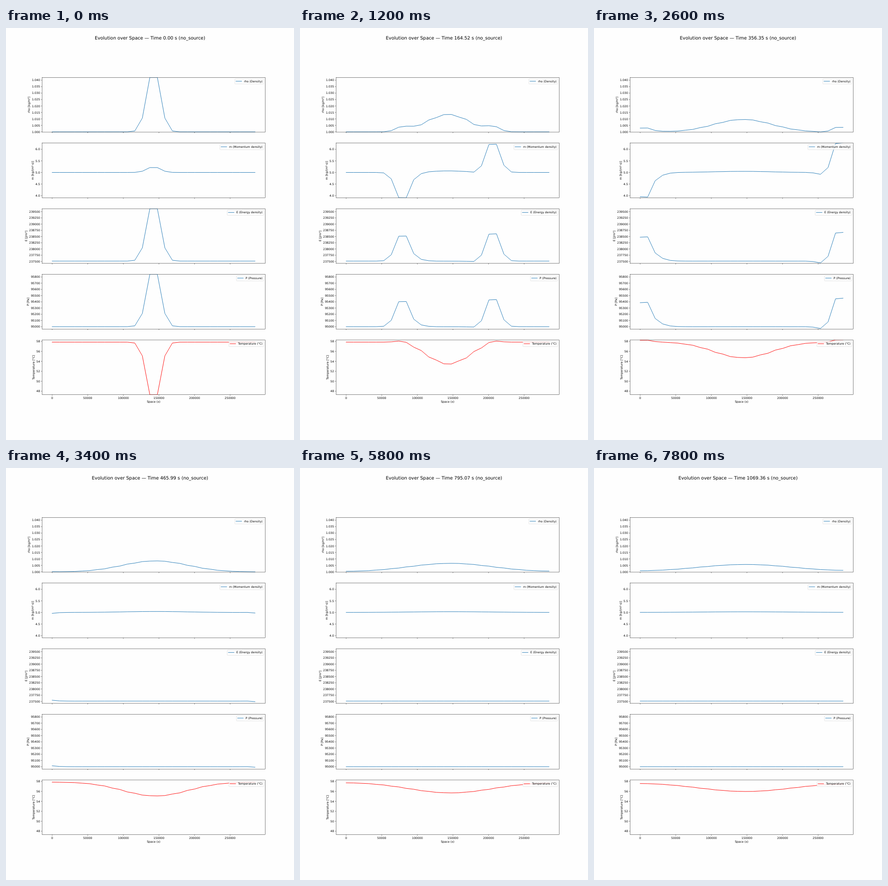
These frames come from a looping animation (626x894 px, 8000 ms). An HTML page:

```html
<!DOCTYPE html>
<html lang="en">
<head>
<meta charset="utf-8">
<title>Evolution over Space</title>
<style>
  html, body { margin: 0; width: 100%; height: 100%; overflow: hidden; background: #fefefe; }
  svg { display: block; width: 626px; height: 894px; }
  text { font-family: "DejaVu Sans", sans-serif; text-rendering: geometricPrecision; fill: #000; }
</style>
</head>
<body>
<svg id="stage" viewBox="0 0 626 894"></svg>
<script>
// Gas flow: Lax-Friedrichs scheme for the 1D Euler equations
const CELLS = 28, LENGTH = 285000, DX = 10000, STEPS = 40, STEP_MS = 200;
const GAMMA = 1.4, R = 287;

const pressure = ([rho, m, E]) => (GAMMA - 1) * (E - m * m / (2 * rho));

function flux(cell) {
  const [rho, m, E] = cell, p = pressure(cell), u = m / rho;
  return [m, m * u + p, u * (E + p)];
}

function initialState() {
  return Array.from({ length: CELLS }, (_, i) => {
    const x = LENGTH * (i / (CELLS - 1) - 0.5);
    const bump = Math.exp(-x * x / (2 * 9000 ** 2));
    const rho = 1 + 0.05 * bump, u = 5, p = 95000 + 1000 * bump;
    return [rho, rho * u, p / (GAMMA - 1) + rho * u * u / 2];
  });
}

function advance(state, dt) {
  const fluxes = state.map(flux);
  return state.map((cell, i) => {
    const l = Math.max(i - 1, 0), r = Math.min(i + 1, CELLS - 1);
    return cell.map((_, k) =>
      (state[l][k] + state[r][k]) / 2 - dt / (2 * DX) * (fluxes[r][k] - fluxes[l][k]));
  });
}

function simulate() {
  const result = [];
  let state = initialState(), time = 0;
  for (let n = 0; n < STEPS; n++) {
    result.push({ time, state });
    const dt = DX / Math.max(...state.map(c => Math.sqrt(GAMMA * pressure(c) / c[0])));
    state = advance(state, dt);
    time += dt;
  }
  return result;
}

// Figure layout, in pixels
const PT = 626 / 14 / 72, EM = 10 * PT;
const LEFT = 78.25, RIGHT = 563.4, TOP = 107.28, HEIGHT = 118.69, PITCH = 142.42;
const BLUE = "#1f77b4";

const panels = [
  { label: "rho [kg/m³]", legend: "rho (Density)", range: [0.99977, 1.0421],
    ticks: [1, 0.005, 9], digits: 3, labelX: 52.2, value: c => c[0] },
  { label: "m [kg/(m²·s)]", legend: "m (Momentum density)", range: [3.908, 6.268],
    ticks: [4, 0.5, 5], digits: 1, labelX: 60.1, value: c => c[1] },
  { label: "E [J/m³]", legend: "E (Energy density)", range: [237420, 239618],
    ticks: [237500, 250, 9], digits: 0, labelX: 46.2, value: c => c[2] },
  { label: "P [Pa]", legend: "P (Pressure)", range: [94962, 95842],
    ticks: [95000, 100, 9], digits: 0, labelX: 50.2, value: pressure },
  { label: "Temperature [°C]", legend: "Temperature (°C)", range: [47.303, 58.293],
    ticks: [48, 2, 6], digits: 0, labelX: 62, color: "red",
    value: c => pressure(c) / (c[0] * R) - 273.15 },
];

const stage = document.getElementById("stage");

function add(tag, attrs, parent = stage) {
  const node = document.createElementNS("http://www.w3.org/2000/svg", tag);
  for (const key in attrs) node.setAttribute(key, attrs[key]);
  return parent.appendChild(node);
}

function addText(content, x, y, anchor = "middle", size = EM, extra = {}) {
  const node = add("text", { x, y, "text-anchor": anchor, "font-size": size, ...extra });
  node.textContent = content;
  return node;
}

const addTick = d => add("path", { d, stroke: "#000", "stroke-width": 0.8 * PT });
const xAt = x => LEFT + (RIGHT - LEFT) * (x / LENGTH + 0.05) / 1.1;

function addLegend(panel, top, color) {
  const right = RIGHT - EM / 2, y = top + EM / 2, pad = 0.4 * EM;
  const box = add("rect", { y, height: 11.2, rx: 0.2 * EM, fill: "#fff", stroke: "#ccc",
    "stroke-width": PT, opacity: 0.8 });
  const text = addText(panel.legend, right - pad, y + 7.2, "end");
  const left = right - text.getComputedTextLength() - 2 * pad - 2.8 * EM;
  box.setAttribute("x", left);
  box.setAttribute("width", right - left);
  add("path", { d: `M${left + pad} ${y + 5.03}h${2 * EM}`, stroke: color,
    "stroke-width": 1.5 * PT, "stroke-linecap": "square" });
}

function buildPanel(panel, index) {
  const top = TOP + PITCH * index, bottom = top + HEIGHT;
  const [low, high] = panel.range, [first, gap, count] = panel.ticks;
  const color = panel.color || BLUE;
  const box = { x: LEFT, y: top, width: RIGHT - LEFT, height: HEIGHT };
  panel.yAt = v => bottom - HEIGHT * (v - low) / (high - low);

  add("rect", box, add("clipPath", { id: "clip" + index }));
  panel.line = add("polyline", { fill: "none", stroke: color, "stroke-width": 1.5 * PT,
    "stroke-linejoin": "round", "stroke-linecap": "square", "clip-path": `url(#clip${index})` });

  for (let i = 0; i < count; i++) {
    const v = first + gap * i, y = panel.yAt(v);
    addTick(`M${LEFT} ${y}h${-3.5 * PT}`);
    addText(v.toFixed(panel.digits), LEFT - 7 * PT, y + 2.27, "end");
  }
  for (let x = 0; x <= 250000; x += 50000) {
    addTick(`M${xAt(x)} ${bottom}v${3.5 * PT}`);
    if (index === panels.length - 1) addText(x, xAt(x), bottom + 9.05);
  }
  add("rect", { ...box, fill: "none", stroke: "#000", "stroke-width": 0.8 * PT });

  const middle = top + HEIGHT / 2;
  addText(panel.label, panel.labelX, middle, "middle", EM,
    { transform: `rotate(-90 ${panel.labelX} ${middle})` });
  addLegend(panel, top, color);
}

panels.forEach(buildPanel);
addText("Space (x)", (LEFT + RIGHT) / 2, 813.4);
const title = addText("", 313, 25.3, "middle", 1.6 * EM);

const history = simulate();
let shown = -1;

function show(n) {
  if (n === shown) return;
  shown = n;
  const { time, state } = history[n];
  title.textContent = `Evolution over Space — Time ${time.toFixed(2)} s (no_source)`;
  for (const { line, yAt, value } of panels) {
    line.setAttribute("points", state.map((cell, i) =>
      `${xAt(LENGTH * i / (CELLS - 1)).toFixed(2)},${yAt(value(cell)).toFixed(2)}`).join(" "));
  }
}

const start = performance.now();
function play() {
  show(Math.floor((performance.now() - start) / STEP_MS) % STEPS);
  requestAnimationFrame(play);
}
play();
</script>
</body>
</html>
```
